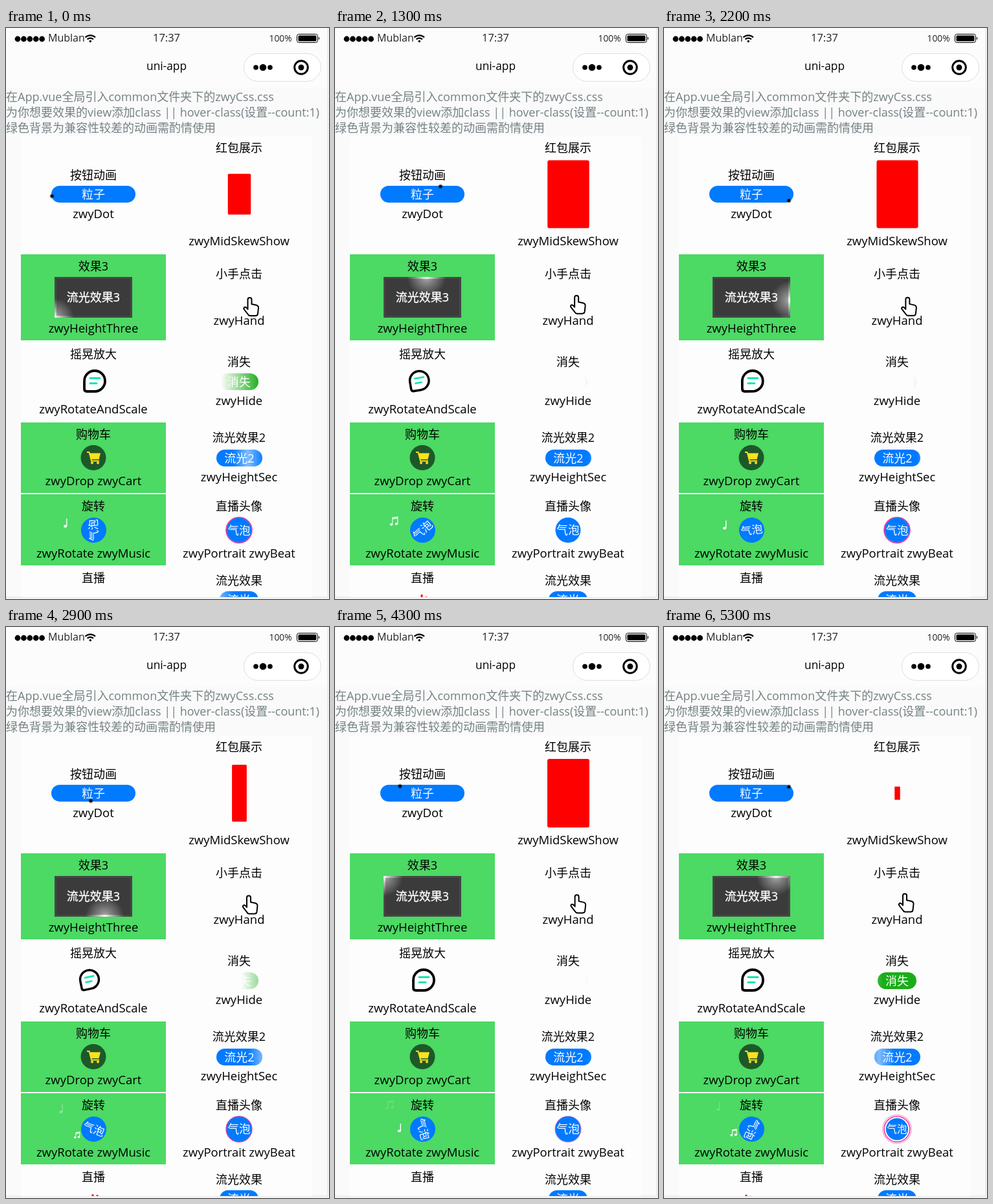
An HTML page for the animation above (5400 ms loop, 499 by 883 pixels).

```html
<!DOCTYPE html>
<html lang="zh-CN">
<head>
<meta charset="utf-8">
<title>uni-app</title>
<style>
html, body { margin: 0; width: 100%; height: 100%; overflow: hidden; background: #fafafa; }
svg { display: block; width: 499px; height: 883px; font-family: "Open Sans", "Noto Sans CJK SC", "Noto Sans CJK", sans-serif; font-size: 18px; }
.mid { text-anchor: middle; }
.tip { fill: #748083; }
.white { fill: #fff; text-anchor: middle; }
</style>
</head>
<body>
<svg viewBox="0 0 499 883" xmlns="http://www.w3.org/2000/svg">
  <defs>
    <radialGradient id="halo">
      <stop offset="0" stop-color="#fff"/>
      <stop offset=".35" stop-color="#fff" stop-opacity=".6"/>
      <stop offset="1" stop-color="#fff" stop-opacity="0"/>
    </radialGradient>
    <radialGradient id="soft">
      <stop offset=".4" stop-color="#000"/>
      <stop offset="1" stop-color="#000" stop-opacity="0"/>
    </radialGradient>
    <linearGradient id="shine">
      <stop offset="0" stop-color="#fff" stop-opacity="0"/>
      <stop offset=".5" stop-color="#fff" stop-opacity=".5"/>
      <stop offset="1" stop-color="#fff" stop-opacity="0"/>
    </linearGradient>
    <linearGradient id="fade" gradientUnits="userSpaceOnUse">
      <stop offset="0" stop-color="#fdfdfd"/>
      <stop offset="1" stop-color="#fdfdfd" stop-opacity="0"/>
    </linearGradient>
    <clipPath id="stage"><rect width="497" height="880"/></clipPath>
    <clipPath id="box"><rect x="75" y="385" width="120" height="63"/></clipPath>
    <clipPath id="core"><rect x="78" y="388" width="114" height="57"/></clipPath>
    <clipPath id="pillA"><rect x="325" y="652" width="71" height="26" rx="13"/></clipPath>
    <clipPath id="pillB"><rect x="330" y="871" width="60" height="26" rx="13"/></clipPath>
    <clipPath id="bowl"><rect x="120" y="645" width="30" height="13"/></clipPath>
  </defs>

  <rect width="499" height="883" fill="#f5f5f5"/>
  <rect width="497" height="880" fill="#fafafa"/>
  <path d="M497 0V880H0" fill="none" stroke="#e2e2e2"/>
  <g clip-path="url(#stage)">
    <rect width="496" height="92" fill="#fcfcfc"/>
    <rect x="23" y="168" width="450" height="712" fill="#fdfdfd"/>
    <g fill="#4cd964">
      <rect x="23" y="350" width="224" height="133"/>
      <rect x="23" y="610" width="224" height="109"/>
      <rect x="23" y="721" width="224" height="110"/>
    </g>

    <g id="signal"></g>
    <text x="65" y="21" font-size="16" fill="#222">Mublan</text>
    <g fill="none" stroke="#000" stroke-width="2.200">
      <path d="M122.500 14.500a11 11 0 0 1 15.500 0M125.500 17.500a7 7 0 0 1 9.500 0"/>
      <circle cx="130.300" cy="20.500" r="1.300" fill="#000" stroke-width="1"/>
    </g>
    <text class="mid" x="248" y="21" font-size="16.400" fill="#222">17:37</text>
    <text x="406.500" y="21" font-size="13.800" fill="#222">100%</text>
    <rect x="449.500" y="9.500" width="32" height="13" rx="3" fill="none" stroke="#000"/>
    <rect x="451.500" y="11.500" width="28" height="9" rx="1.500"/>
    <path d="M483 13.500q2.500 2.500 0 5z"/>
    <text class="mid" x="248" y="65" font-size="17.300">uni-app</text>
    <rect x="367.500" y="39.500" width="119" height="43" rx="21.500" fill="#fff" stroke="#dedede"/>
    <circle cx="386" cy="61" r="3.800"/><circle cx="397" cy="61" r="5.300"/><circle cx="408" cy="61" r="3.800"/>
    <circle cx="456" cy="61" r="10.300" fill="none" stroke="#000" stroke-width="3"/><circle cx="456" cy="61" r="4.500"/>

    <text class="tip" x="0" y="112.500">在App.vue全局引入common文件夹下的zwyCss.css</text>
    <text class="tip" x="0" y="136.500">为你想要效果的view添加class || hover-class(设置--count:1)</text>
    <text class="tip" x="0" y="160.500">绿色背景为兼容性较差的动画需酌情使用</text>
    <g id="labels"></g>

    <rect x="70" y="244" width="130" height="26" rx="13" fill="#007aff"/>
    <text class="white" x="135" y="263.500">粒子</text>
    <g id="dot"><circle r="4.500" fill="url(#soft)" opacity=".5"/><circle r="2.300"/></g>

    <rect id="card" x="-32.500" y="-53" width="65" height="106" rx="3" fill="#f00"/>

    <rect x="75" y="385" width="120" height="63" fill="#464746"/>
    <g clip-path="url(#box)"><circle class="glow" r="30" fill="url(#halo)"/></g>
    <rect x="78" y="388" width="114" height="57" fill="#3a3b3a"/>
    <g clip-path="url(#core)" opacity=".6"><circle class="glow" r="30" fill="url(#halo)"/></g>
    <text class="white" x="135" y="422.500" stroke="#fff" stroke-width=".3">流光效果3</text>

    <path id="hand" d="M7.500 19V4a3 3 0 0 1 6 0V11L20.500 12.500q3.700 1 3.500 4.500L23 26q-.5 3-3.500 3H11q-2 0-3-2L1.800 19q-1.200-2 .7-3.200q2-1 5 3.200"
      fill="#fff" stroke="#000" stroke-width="2" stroke-linejoin="round" stroke-linecap="round"/>

    <g id="bubble" fill="none">
      <path d="M0-16A16 16 0 0 1 0 16H-12q-4 0-4-4V0A16 16 0 0 1 0-16z" fill="#fff" stroke="#000" stroke-width="3.800"/>
      <path d="M-7-4.500H8M-7 3.500H3" stroke="#10e8ae" stroke-width="3" stroke-linecap="round"/>
    </g>

    <rect x="330" y="534" width="60" height="26" rx="13" fill="#1aad19"/>
    <text class="white" x="360" y="554">消失</text>
    <rect x="328" y="532" width="64" height="30" fill="url(#fade)"/>

    <circle cx="135" cy="664.500" r="19.500" fill="#1e5829"/>
    <g clip-path="url(#bowl)">
      <ellipse id="egg" cx="135" rx="3.300" ry="4" fill="#fff"/>
      <rect id="book" x="130" y="-3" width="10" height="6" rx="1.500" fill="#1d6fc4"/>
    </g>
    <g fill="#ffe11f">
      <path d="M129 657.500H146L143.500 667H131.500z"/>
      <path d="M125 656h3.500l3.500 13.500h12" fill="none" stroke="#ffe11f" stroke-width="1.800"/>
      <circle cx="133" cy="672.500" r="1.900"/><circle cx="142" cy="672.500" r="1.900"/>
    </g>

    <rect x="325" y="652" width="71" height="26" rx="13" fill="#007aff"/>
    <g clip-path="url(#pillA)"><rect id="beam" x="-24" y="652" width="48" height="26" fill="url(#shine)"/></g>
    <text class="white" x="360.500" y="671.500">流光2</text>

    <g id="single" fill="#fff"><ellipse cx="-1.200" cy="5" rx="2.600" ry="2.200"/><path d="M.2-7h1.500V5H.2z"/></g>
    <g id="pair" fill="#fff">
      <ellipse cx="-4" cy="5" rx="2.500" ry="2"/><ellipse cx="4" cy="4" rx="2.500" ry="2"/>
      <path d="M-3-6L6.500-7.500V4H5.100V-4L-1.700-3V5H-3z"/>
    </g>

    <g id="spin">
      <circle r="19.500" fill="#007aff"/>
      <text class="white" y="6" font-size="17">气泡</text>
    </g>

    <circle id="wave" cx="360" cy="776.500" fill="none" stroke="#f58ac4" stroke-width="1.300"/>
    <circle id="ring" cx="360" cy="776.500" r="19.800" fill="#fff" stroke="#f0349a" stroke-width="1.600"/>
    <g id="beat">
      <circle r="18.500" fill="#007aff"/>
      <text class="white" y="6" font-size="16.800">气泡</text>
    </g>

    <g id="bars" fill="#f00"></g>
    <rect x="330" y="871" width="60" height="26" rx="13" fill="#007aff"/>
    <g clip-path="url(#pillB)"><path id="slant" d="M-16 871H24L14 897H-26z" fill="url(#shine)"/></g>
    <text class="white" x="360" y="890.500">流光</text>
  </g>
</svg>
<script>
const NS = 'http://www.w3.org/2000/svg';
const $ = id => document.getElementById(id);
const set = (el, attrs) => { for (const k in attrs) el.setAttribute(k, attrs[k]); };
const add = (parent, tag, attrs, text) => {
  const el = document.createElementNS(NS, tag);
  set(el, attrs);
  if (text) el.textContent = text;
  parent.appendChild(el);
  return el;
};
const move = (id, x, y, rest = '') => set($(id), { transform: `translate(${x} ${y}) ${rest}` });
const mod = (a, n) => ((a % n) + n) % n;
const wave = (t, period) => Math.cos(2 * Math.PI * t / period);
const clamp = v => Math.max(0, Math.min(1, v));

// Linear interpolation through rows of [key, v1, v2, ...]
function along(rows, k) {
  let i = 1;
  while (i < rows.length - 1 && k > rows[i][0]) i++;
  const a = rows[i - 1], b = rows[i], u = clamp((k - a[0]) / (b[0] - a[0]));
  return a.slice(1).map((v, j) => v + (b[j + 1] - v) * u);
}

for (let i = 0; i < 5; i++) add($('signal'), 'circle', { cx: 18 + i * 9.4, cy: 17, r: 4.4 });

const labels = {
  135: [['按钮动画', 227], ['zwyDot', 288], ['效果3', 368], ['zwyHeightThree', 465], ['摇晃放大', 504],
    ['zwyRotateAndScale', 590], ['购物车', 628], ['zwyDrop zwyCart', 701], ['旋转', 739],
    ['zwyRotate zwyMusic', 813], ['直播', 850]],
  360: [['红包展示', 185], ['zwyMidSkewShow', 330], ['小手点击', 380], ['zwyHand', 453], ['消失', 516],
    ['zwyHide', 577], ['流光效果2', 633], ['zwyHeightSec', 695], ['直播头像', 739],
    ['zwyPortrait zwyBeat', 813], ['流光效果', 854]]
};
for (const x in labels) for (const [text, y] of labels[x]) {
  const latin = text.startsWith('zwy');
  add($('labels'), 'text', { class: 'mid', x, y: y + (latin ? 6 : 6.8), 'font-size': latin ? 18.5 : 18 }, text);
}

const bars = [127, 134, 141].map(x => add($('bars'), 'rect', { x: x - 1.5, width: 3, height: 30 }));
const glows = document.querySelectorAll('.glow');

const dotPath = [[0, 71, 260], [130, 70, 255], [330, 76, 247], [1020, 134, 245], [1300, 163, 245], [1620, 193, 247],
  [1910, 199, 257], [2200, 193, 267], [2900, 131, 269], [3440, 78, 268], [3680, 71, 260]];
const boxPath = [[0, 75, 448], [633, 75, 385], [1840, 195, 385], [2473, 195, 448], [3680, 75, 448]];
const notePath = [[0, 113], [10, 107.5], [22, 96], [29, 91], [37, 90], [50, 85], [60, 83]];

function note(id, age) {
  const rise = age * 0.0335;
  const size = Math.min(1, 0.6 + rise / 50);
  move(id, along(notePath, rise)[0], 792 - rise, `scale(${size})`);
  set($(id), { opacity: rise < 22 ? 1 : clamp(1 - (rise - 22) / 36) });
}

function drop(id, age) {
  move(id, 0, 640 + 28 * clamp(age / 400));
  set($(id), { visibility: age > 0 && age < 400 ? 'visible' : 'hidden' });
}

function draw(t) {
  move('dot', ...along(dotPath, t % 3680));

  // Shared ease-out for the card, the wipe and the first beam
  const x = clamp(mod(t + 230, 914) / 675);
  const p = 1 - (1 - x) ** 2;
  const size = 0.07 + 0.93 * p;
  const turn = Math.abs(Math.cos(2 * Math.PI * p));
  move('card', 360.5, 257, `scale(${size * turn} ${size})`);
  const edge = 262 + 124 * p;
  set($('fade'), { x1: edge, x2: edge + 60, y1: 0, y2: 0 });
  move('beam', 320 + 95 * p, 0);

  const [gx, gy] = along(boxPath, t % 3680);
  glows.forEach(g => set(g, { cx: gx, cy: gy }));

  const tap = (1 + wave(t, 558)) / 2;
  move('hand', 361.5 + 4.5 * tap, 411.5 + 4.5 * tap);

  const [shake] = along([[0, 0], [500, 1], [900, 0], [1097, 0]], t % 1097);
  move('bubble', 137 - 16.5 * shake, 546 - 2 * shake, `rotate(${-24 * shake}) scale(${1 - 0.2 * shake})`);

  const fall = t % 2742;
  drop('egg', fall - 900);
  drop('book', fall - 1780);

  note('single', mod(t + 790, 2285));
  note('pair', mod(t - 430, 2285));
  move('spin', 135.5, 776.5, `rotate(${-93 + 0.0388 * t})`);

  const pulse = t % 731;
  set($('wave'), { r: 20 + 0.0115 * pulse, opacity: clamp((520 - pulse) / 400) });
  set($('ring'), { opacity: clamp(Math.abs(pulse - 570) / 90 - 0.2) });
  move('beat', 360, 776.5, `scale(${(18.2 - 1.5 * wave(pulse - 270, 731)) / 18.5})`);

  [[882, 350], [880, 235], [882, 130]].forEach(([y, peak], i) =>
    set(bars[i], { y: y - 4 * wave(t - peak, 548) }));
  move('slant', 329 + 0.2 * (mod(t + 285, 2285) - 285), 0);
}

const start = performance.now();
function tick() {
  const t = mod(performance.now() - start, 5400);
  draw(Math.floor(t / 100) * 100);
  requestAnimationFrame(tick);
}
draw(0);
requestAnimationFrame(tick);
</script>
</body>
</html>
```
